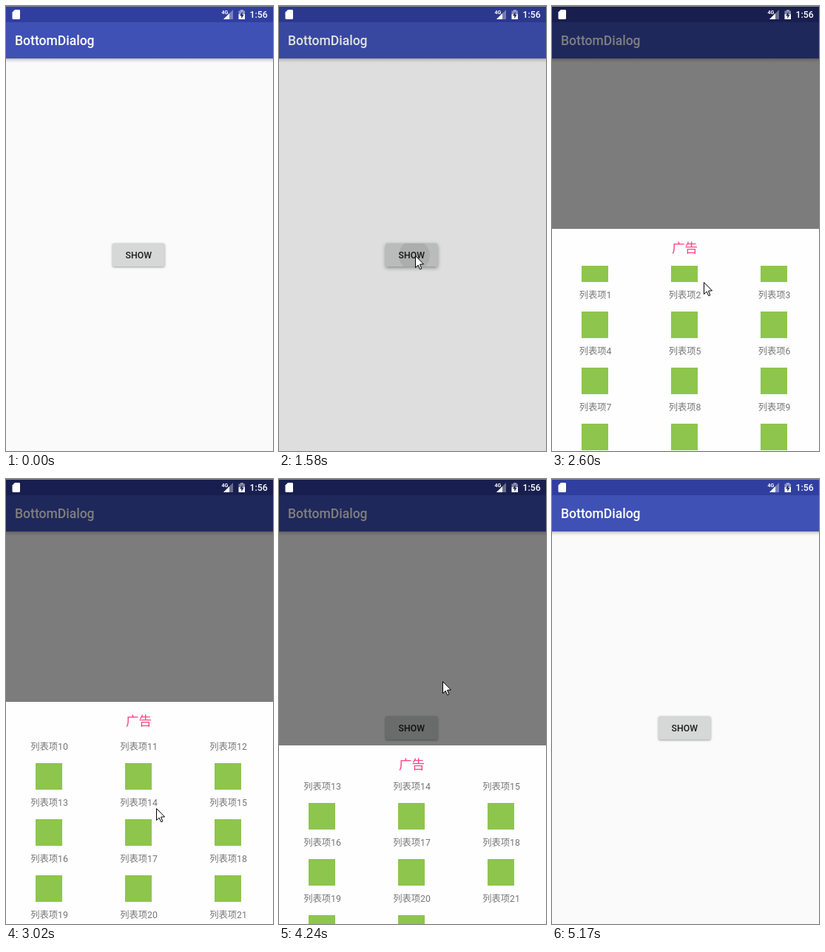
An HTML page with a canvas for the animation above (6450 ms loop, 361x603 px).

```html
<!DOCTYPE html>
<html lang="zh">
<head>
<meta charset="utf-8">
<title>BottomDialog</title>
<style>
  html, body { margin: 0; width: 100%; height: 100%; overflow: hidden; background: #fafafa; }
  canvas { display: block; }
</style>
</head>
<body>
<canvas id="stage" width="361" height="603"></canvas>
<script>
const W = 361, H = 603, LOOP = 6450;
const SHEET_TOP = 302, LIST_TOP = 352, ROW = 76, COLUMN = 121, ITEMS = 23;
const ctx = document.getElementById('stage').getContext('2d');
const FONT = 'Roboto, "Noto Sans CJK SC", "Noto Sans CJK", sans-serif';

// The picture updates every 120 ms, with a slightly longer hold before each of these.
const BEATS = [0, 400, 550, 1060, 1580, 1850, 2240, 2750, 3020, 3170, 3450, 3720, 4240, 4390, 4660, 5050, 5170, LOOP];

// Pointer legs after its entry: arrival time and place.
const POINTER = [
  { at: 400, x: 252, y: 523 }, { at: 910, x: 187, y: 339 },
  { at: 1060, x: 184, y: 338 }, { at: 2090, x: 184, y: 338 },
  { at: 2480, x: 205, y: 393 }, { at: 2750, x: 204, y: 350 },
  { at: 3170, x: 202, y: 500 }, { at: 3450, x: 201, y: 442 },
  { at: 3960, x: 214, y: 247 }, { at: 4240, x: 221, y: 274 },
  { at: 4660, x: 274, y: 520 }, { at: 5050, x: 314, y: 587 }
];

const span = (t, start, end) => Math.min(1, Math.max(0, (t - start) / (end - start)));
const easeIn = k => k * k;
const easeOut = k => 1 - (1 - k) ** 2;

function hold(now) {
  const i = BEATS.findLastIndex(b => b <= now), start = BEATS[i];
  const ticks = Math.round((BEATS[i + 1] - start) / 130);
  return start + 120 * Math.min(Math.floor((now - start) / 120), ticks - 1);
}

function pointerAt(t) {
  const i = Math.max(1, POINTER.findIndex(p => p.at >= t));
  const a = POINTER[i - 1], b = POINTER[i], k = span(t, a.at, b.at);
  return { x: Math.round(a.x + (b.x - a.x) * k), y: Math.round(a.y + (b.y - a.y) * k) };
}

const dimAt = t => t < 4510
  ? .5 * span(t, 1544, 1700)
  : .5 * (1 - easeOut(span(t, 4510, 4945)));
const sheetAt = t => t < 3960
  ? 301 * (1 - easeOut(span(t, 1580, 2090)))
  : 301 * easeIn(span(t, 3960, 4592));
// A short drag, then a fling to the end of the list.
const scrollAt = t => Math.round(43 * span(t, 2480, 2750) + 314 * easeOut(span(t, 2750, 3300)));
const glowAt = t => .468 * Math.sin(Math.PI * span(t, 3170, 3960));

function rect(x, y, w, h, color) {
  ctx.fillStyle = color;
  ctx.fillRect(x, y, w, h);
}

function polygon(points, color) {
  ctx.beginPath();
  points.forEach(([x, y]) => ctx.lineTo(x, y));
  ctx.closePath();
  ctx.fillStyle = color;
  ctx.fill();
}

function text(str, x, y, size, color, weight = 400, align = 'left') {
  ctx.font = `${weight} ${size}px ${FONT}`;
  ctx.textAlign = align;
  ctx.fillStyle = color;
  ctx.fillText(str, x, y);
}

function drawPage(t) {
  rect(0, 0, W, H, '#fafafa');
  const shadow = ctx.createLinearGradient(0, 71, 0, 77);
  shadow.addColorStop(0, 'rgba(0,0,0,.27)');
  shadow.addColorStop(.4, 'rgba(0,0,0,.1)');
  shadow.addColorStop(1, 'rgba(0,0,0,0)');
  rect(0, 71, W, 6, shadow);
  rect(0, 0, W, 22, '#303f9f');
  rect(0, 22, W, 49, '#3f51b5');
  text('BottomDialog', 12, 53, 17.54, '#fff', 500);
  drawButton(t);
}

function drawButton(t) {
  const pressed = t >= 1580 && t < 2090;
  ctx.save();
  ctx.beginPath();
  ctx.roundRect(144, 321.5, 70.5, 31.5, 2);
  ctx.shadowColor = 'rgba(0,0,0,.38)';
  ctx.shadowBlur = pressed ? 5 : 3;
  ctx.shadowOffsetY = pressed ? 2 : 1;
  ctx.fillStyle = pressed ? '#d1d4d3' : '#d6d7d7';
  ctx.fill();
  ctx.shadowColor = 'transparent';
  if (pressed) {
    ctx.clip();
    ctx.beginPath();
    ctx.arc(183, 338, 21 + (t - 1580) / 11, 0, 7);
    ctx.fillStyle = 'rgba(0,0,0,.075)';
    ctx.fill();
  }
  ctx.restore();
  text('SHOW', 179.3, 342, 12.28, 'rgba(0,0,0,.87)', 500, 'center');
}

function drawStatusIcons() {
  // memory card
  polygon([[12, 5], [18, 5], [19, 6], [19, 17], [18, 18], [9.5, 18], [8.5, 17], [8.5, 8.5]], '#fff');
  // signal
  polygon([[307, 5], [307, 18], [294, 18]], 'rgba(255,255,255,.35)');
  polygon([[302, 10], [302, 18], [294, 18]], '#fff');
  text('4G', 291.5, 11, 7, '#fff', 700);
  // battery
  rect(317, 5, 4, 2, 'rgba(255,255,255,.45)');
  rect(314.5, 6.5, 8.5, 4.5, 'rgba(255,255,255,.45)');
  rect(314.5, 11, 8.5, 7, '#fff');
  polygon([[319.5, 8], [316, 13.2], [318.3, 13.2], [318.3, 17], [321.7, 11.8], [319.5, 11.8]], '#1e2766');
  text('1:56', 329.5, 16, 12.28, '#fff', 500);
}

function drawSheet(offset, scroll, glow) {
  if (offset >= 301) return;
  ctx.save();
  ctx.translate(0, Math.round(offset));
  rect(0, SHEET_TOP, W, H - SHEET_TOP, '#fefefe');
  text('广告', 179.5, 334, 17.54, '#ff4081', 400, 'center');
  ctx.beginPath();
  ctx.rect(0, LIST_TOP, W, H - LIST_TOP);
  ctx.clip();
  for (let i = 0; i < ITEMS; i++) {
    const x = 58.5 + (i % 3) * COLUMN;
    const y = 410 + Math.floor(i / 3) * ROW - scroll;
    rect(x - 18.5, y - 53, 36, 36, '#8ec54d');
    text('列表项' + (i + 1), x, y + 5, 12.28, '#757575', 400, 'center');
  }
  if (glow > 0) drawGlow(glow);
  ctx.restore();
}

// Overscroll arc: a 60 degree circle cap squashed vertically.
function drawGlow(amount) {
  const radius = W * 1.5, cap = radius * (1 - Math.cos(Math.PI / 6));
  ctx.beginPath();
  ctx.ellipse(W / 2, H + (radius - cap) * amount, radius, radius * amount, 0, 0, Math.PI * 2);
  ctx.fillStyle = `rgba(63,81,181,${Math.min(.18, amount * .43)})`;
  ctx.fill();
}

function drawPointer({ x, y }) {
  ctx.save();
  ctx.translate(x + .5, y + .5);
  polygon([[0, 0], [0, 16], [3.7, 12.6], [6.2, 18.2], [8.4, 17.3], [6, 11.6], [11, 11.3]], '#fff');
  ctx.strokeStyle = '#000';
  ctx.lineWidth = 1;
  ctx.stroke();
  ctx.restore();
}

function draw(t) {
  drawPage(t);
  rect(0, 0, W, H, `rgba(0,0,0,${dimAt(t)})`);
  drawStatusIcons();
  rect(0, 0, W, 1, '#8d8b86');
  drawSheet(sheetAt(t), scrollAt(t), glowAt(t));
  if (t >= 400 && t < 5170) drawPointer(pointerAt(t));
}

function tick() {
  draw(hold(performance.now() % LOOP));
  requestAnimationFrame(tick);
}
tick();
</script>
</body>
</html>
```
